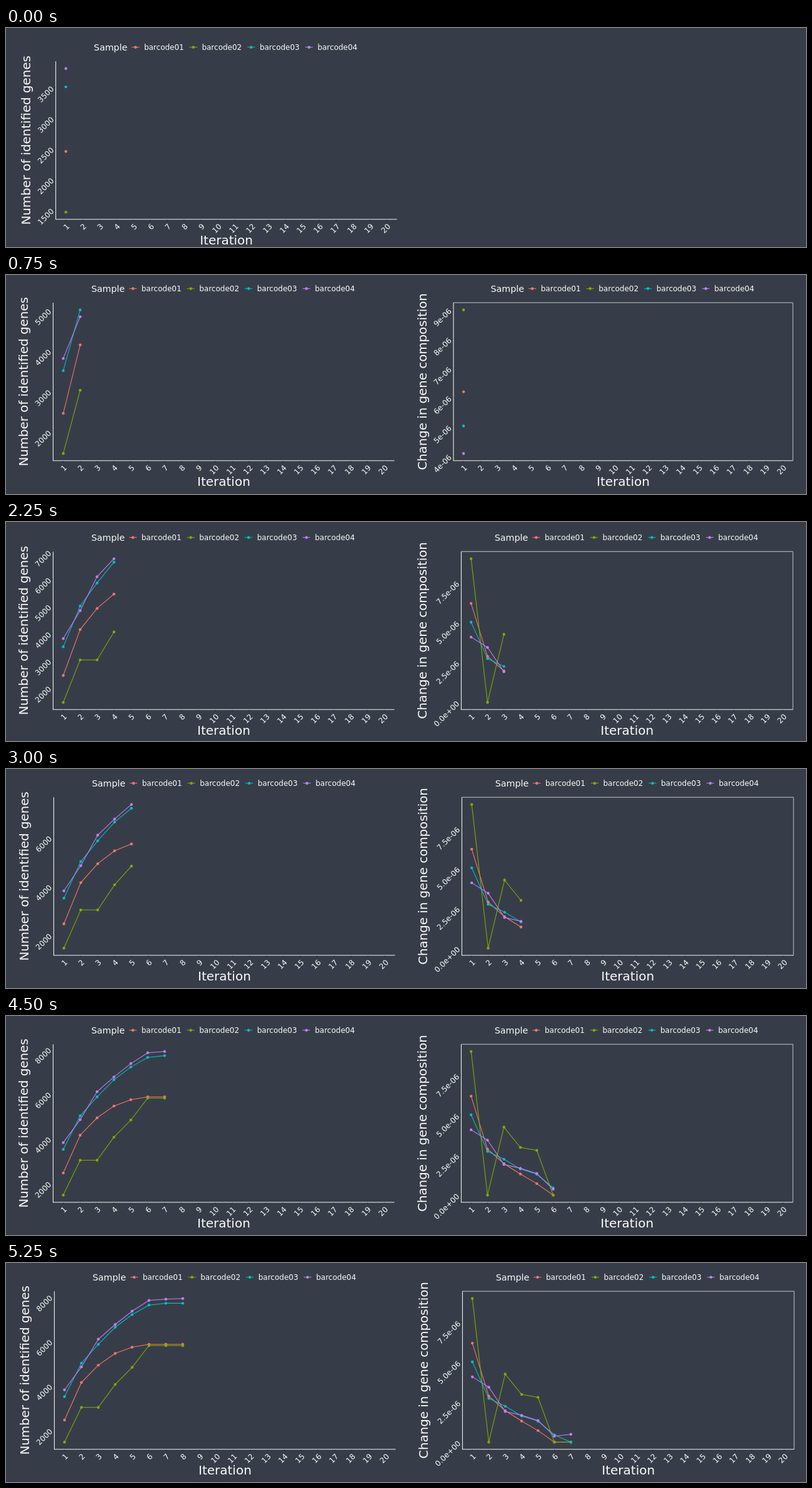
Animation of 1280 by 350 pixels, one loop 6 s. Source, as an HTML page:

```html
<!DOCTYPE html>
<html lang="en">
<head>
<meta charset="utf-8">
<title>Genes per iteration</title>
<style>
  html, body { margin: 0; width: 100%; height: 100%; overflow: hidden; background: #373d48; }
  svg { display: block; width: 1280px; height: 350px; }
  text { font-family: "DejaVu Sans", sans-serif; font-size: 12px; fill: #fafafa; }
  .axis { stroke: #f4f4f4; stroke-width: 1.07; fill: none; }
  .border { stroke: #c4c7cb; stroke-width: 1; fill: none; }
  .tick { stroke: #2b2e35; stroke-width: 1; }
  .line { stroke-width: 1.07; fill: none; }
  .end { text-anchor: end; }
  .mid { text-anchor: middle; }
  .name { font-size: 14.3px; }
  .xtitle { font-size: 20px; }
  .ytitle { font-size: 19.8px; }
</style>
</head>
<body>
<svg id="stage" viewBox="0 0 1280 350"></svg>
<script>
const STEP_MS = 750, ITERATIONS = 20, HEIGHT = 252.5;
const COLORS = ["#F8766D", "#7CAE00", "#00BFC4", "#C77CFF"];

const GENES = [
  [2456, 4146, 4922, 5451, 5734, 5861, 5861, 5861],
  [1465, 3027, 3027, 4057, 4824, 5805, 5805, 5805],
  [3511, 5013, 5860, 6626, 7195, 7625, 7706, 7706],
  [3812, 4842, 6092, 6753, 7350, 7835, 7893, 7922]
];
// in millionths
const CHANGE = [
  [6.2, 2.88, 1.97, 1.32, 0.72, 0, 0],
  [9, 0, 4.26, 2.99, 2.8, 0, 0],
  [5.03, 2.74, 2.25, 1.64, 1.31, 0.45, 0],
  [4.09, 3.44, 1.92, 1.68, 1.35, 0.37, 0.49]
];

// left panel x, right panel x, panel bottom, gene tick interval
const STEPS = [
  [79.6, 0, 305.7, 500],
  [75.4, 715.9, 296.7, 1000],
  [76.4, 729.4, 294.7, 1000],
  [75.4, 728.4, 299.7, 1000],
  [76.4, 729.4, 297.7, 2000],
  [76.4, 728.4, 296.7, 2000],
  [75.4, 728.4, 297.7, 2000],
  [77.4, 730.4, 297.7, 2000]
];

function add(parent, tag, attrs, text) {
  const el = document.createElementNS("http://www.w3.org/2000/svg", tag);
  for (const key in attrs) el.setAttribute(key, attrs[key]);
  if (text !== undefined) el.textContent = text;
  return parent.appendChild(el);
}

function label(g, x, y, text, cls = "", angle = 0) {
  add(g, "text", { class: cls, transform: `translate(${x} ${y}) rotate(${angle})` }, text);
}

function path(g, d, cls, color) {
  add(g, "path", color ? { d, class: cls, stroke: color } : { d, class: cls });
}

function dot(g, x, y, color) {
  add(g, "circle", { cx: x, cy: y, r: 2.2, fill: color });
}

function legend(g, cx, cy) {
  label(g, cx - 212, cy + 5, "Sample", "name");
  COLORS.forEach((color, i) => {
    const x = cx - 145.3 + i * 92.5;
    path(g, `M${x - 6} ${cy}h12`, "line", color);
    dot(g, x, cy, color);
    label(g, x + 13.6, cy + 4.4, "barcode0" + (i + 1));
  });
}

function chart(g, o) {
  const { x, bottom, width, count } = o;
  const top = bottom - HEIGHT, cx = x + width / 2;
  const unit = width / (ITERATIONS + 0.2);
  const rows = o.data.map(row => row.slice(0, count));
  const values = rows.flat();
  const min = Math.min(...values), max = Math.max(...values);
  const pad = (max - min) * 0.05;
  const px = i => x + (i + 0.6) * unit;
  const py = v => bottom - (v - min + pad) / (max - min + 2 * pad) * HEIGHT;

  if (o.border) path(g, `M${x} ${top}h${width}v${HEIGHT}`, "border");
  rows.forEach((row, s) =>
    path(g, "M" + row.map((v, i) => `${px(i)} ${py(v)}`).join("L"), "line", COLORS[s]));
  rows.forEach((row, s) => row.forEach((v, i) => dot(g, px(i), py(v), COLORS[s])));
  path(g, `M${x} ${top}V${bottom}h${width}`, "axis");

  for (let i = 0; i < ITERATIONS; i++) {
    path(g, `M${px(i)} ${bottom + 0.5}v2.7`, "tick");
    label(g, px(i) + 6.6, bottom + 12.2, i + 1, "end", -45);
  }
  const first = Math.ceil((min - pad) / o.interval);
  for (let k = first; k * o.interval <= max + pad; k++) {
    const y = py(k * o.interval);
    path(g, `M${x - 0.5} ${y}h-2.7`, "tick");
    label(g, x - 2.2, y + 2.9, o.format(k * o.interval), "end", -45);
  }
  label(g, cx, bottom + 40.3, "Iteration", "mid xtitle");
  label(g, x - o.gap, bottom - HEIGHT / 2, o.title, "mid ytitle", -90);
  legend(g, cx, bottom - 275);
}

const stage = document.getElementById("stage");
const scenes = STEPS.map(([left, right, bottom, interval], i) => {
  const g = add(stage, "g", { display: "none" });
  chart(g, {
    x: left, bottom, width: 546, count: i + 1, data: GENES, interval,
    title: "Number of identified genes", gap: 40.6, format: String
  });
  if (i > 0) {
    const single = i === 1;
    chart(g, {
      x: right, bottom, width: single ? 543.1 : 530.6, count: i, data: CHANGE,
      interval: single ? 1 : 2.5, border: true,
      title: "Change in gene composition", gap: single ? 43 : 55.5,
      format: v => v ? v.toFixed(single ? 0 : 1) + "e-06" : "0.0e+00"
    });
  }
  return g;
});

let shown = -1;
const start = performance.now();
function draw(now) {
  const step = Math.floor(Math.max(0, now - start) / STEP_MS) % scenes.length;
  if (step !== shown) {
    scenes.forEach((g, i) => g.setAttribute("display", i === step ? "inline" : "none"));
    shown = step;
  }
  requestAnimationFrame(draw);
}
draw(start);
</script>
</body>
</html>
```
